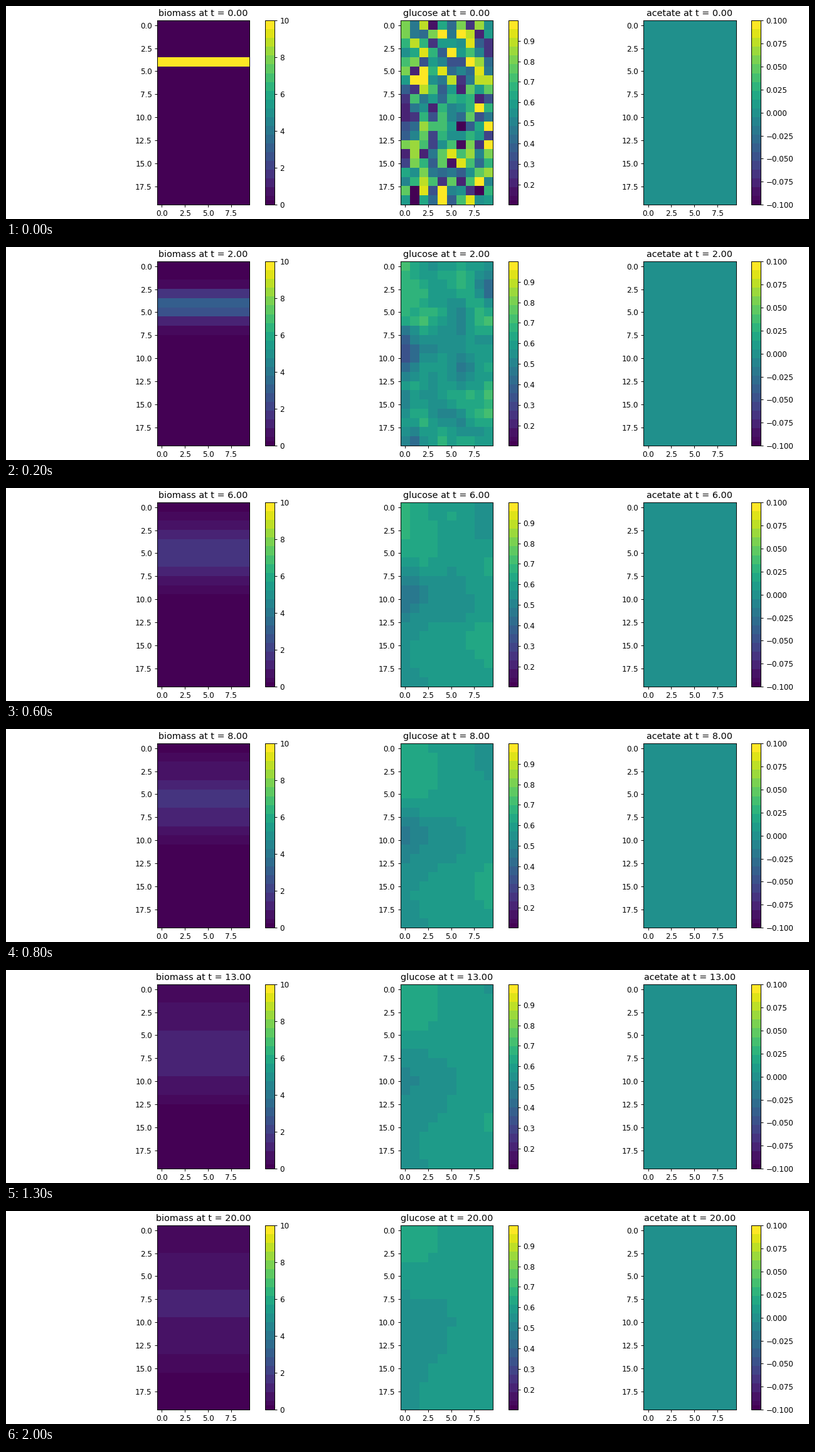
Recreate the animation shown at these times as a matplotlib script. Size 1280 by 341 pixels, loop 2100 ms.

```python
import numpy as np
import matplotlib.pyplot as plt
from matplotlib.animation import FuncAnimation
from matplotlib.colors import ListedColormap

W, H, DPI = 1280, 341, 80
ROWS, COLS, STEPS = 20, 10, 21
CELL = 14.74          # pixels per grid cell
TOP = 23.3
DIFFUSION, FLOW = 0.3, 0.22
SUBSTEPS = 40

S = 1.08              # text and line scale
plt.rcParams.update({
    "font.family": "DejaVu Sans",
    "font.size": 10 * S,
    "axes.titlesize": 12 * S,
    "axes.titlepad": 6 * S,
    "axes.linewidth": 0.8 * S,
})
for axis in ("xtick", "ytick"):
    plt.rcParams[axis + ".major.size"] = 3.5 * S
    plt.rcParams[axis + ".major.width"] = 0.8 * S
    plt.rcParams[axis + ".major.pad"] = 3.5 * S


def banded_cmap(levels=21):
    """Viridis in flat bands, with one extra step at the dark end."""
    shade = np.arange(2 * levels) // 2 / (levels - 1)
    shade[1] = 0.025
    return ListedColormap(plt.get_cmap("viridis")(shade))


def wave(k, n):
    return np.cos(np.pi * k * (np.arange(n) + 0.5) / n)


def start_glucose():
    """Fine random grain on a few broad cosine waves."""
    broad = {(0, 0): 0.585, (1, 0): 0.014, (0, 1): -0.014,
             (1, 1): 0.045, (2, 0): 0.025, (2, 1): 0.042}
    field = np.random.default_rng(4).uniform(0, 0.88, (ROWS, COLS))
    for k, m in np.ndindex(4, 3):
        w = np.outer(wave(k, ROWS), wave(m, COLS))
        now = (field * w).sum() / (w * w).sum()
        field += (broad.get((k, m), 0) - now) * w
    return field.clip(0.1, 1)


def spread(field, axis):
    """Closed-wall diffusion along one axis."""
    width = [(0, 0), (0, 0)]
    width[axis] = (1, 1)
    return np.diff(np.pad(field, width, mode="edge"), n=2, axis=axis)


def drift(field):
    """Upwind transport down the rows, level at the top edge."""
    return np.vstack([field[:1], field[:-1]]) - field


def simulate(field, flow):
    history = [field]
    dt = 1 / SUBSTEPS
    for _ in range(STEPS - 1):
        for _ in range(SUBSTEPS):
            change = DIFFUSION * (spread(field, 0) + spread(field, 1))
            field = field + dt * (change + flow * drift(field))
        history.append(field)
    return history


def place(left, width):
    height = ROWS * CELL
    return fig.add_axes([left / W, 1 - (TOP + height) / H,
                         width / W, height / H])


biomass = np.zeros((ROWS, COLS))
biomass[4] = 10
fields = [
    ("biomass", simulate(biomass, FLOW), 0, 10),
    ("glucose", simulate(start_glucose(), 0), 0.101, 0.999),
    ("acetate", [np.zeros((ROWS, COLS))] * STEPS, -0.1, 0.1),
]

fig = plt.figure(figsize=(W / DPI, H / DPI), dpi=DPI, facecolor="white")
cmap = banded_cmap()
panels = []
for k, (name, history, low, high) in enumerate(fields):
    left = 240.95 + 387.6 * k
    ax = place(left, COLS * CELL)
    image = ax.imshow(history[0], cmap=cmap, vmin=low, vmax=high,
                      aspect="auto", interpolation="nearest")
    ax.set_xticks(np.arange(0, 10, 2.5))
    ax.set_yticks(np.arange(0, 20, 2.5))
    fig.colorbar(image, cax=place(left + 172.3, CELL))
    panels.append((name, history, image, ax.set_title("")))


def update(t):
    artists = []
    for name, history, image, title in panels:
        image.set_data(history[t])
        title.set_text(f"{name} at t = {t:.2f}")
        artists += [image, title]
    return artists


anim = FuncAnimation(fig, update, frames=STEPS, interval=100,
                     init_func=lambda: update(0), repeat=True,
                     repeat_delay=0, blit=False)
plt.show()
```
